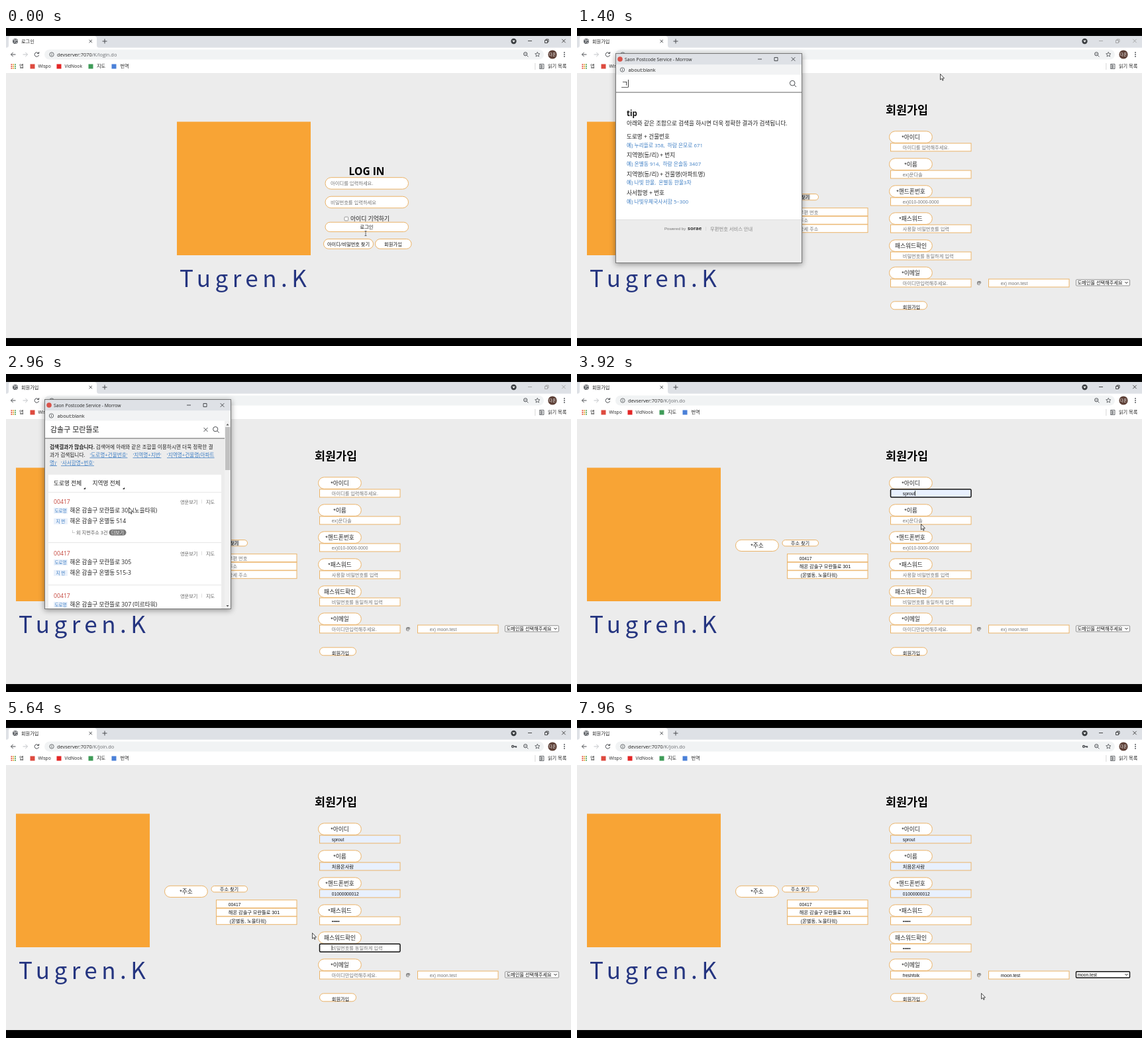
These frames come from a looping animation (853x480 px, 8000 ms). An HTML page:

```html
<!DOCTYPE html>
<html lang="ko">
<head>
<meta charset="utf-8">
<title>회원가입</title>
<style>
html, body { margin: 0; width: 100%; height: 100%; overflow: hidden; background: #000; }
svg { display: block; width: 100%; height: 100%; font-family: "Open Sans", "Noto Sans CJK KR", sans-serif; }
text { white-space: pre; }
.form { font-family: "Liberation Sans", "Noto Sans CJK KR", sans-serif; }
.brand { font-family: "Noto Sans CJK KR", sans-serif; font-weight: 500; letter-spacing: 6.5px; }
.icon { fill: none; stroke: #4a4d51; stroke-width: 1; }
.popup { filter: drop-shadow(0 2px 4px #0006); }
.menu { filter: drop-shadow(0 1px 2px #0005); }
</style>
</head>
<body>
<svg id="stage" viewBox="0 0 853 480"></svg>
<script>
const LOOP = 8000, JOIN = 400, OPEN = 920, RESULTS = 2400, PICKED = 3080;
const ORANGE = '#f8a435', EDGE = '#ebb368', GRAY = '#757575', BLUE = '#3f7fc4';
const stage = document.getElementById('stage');

const text = (x, y, s, size, fill = '#222', extra = '') =>
  `<text x="${x}" y="${y}" font-size="${size}" fill="${fill}" ${extra}>${s}</text>`;
const mid = 'text-anchor="middle"', bold = 'font-weight="700"', form = 'class="form"';
const rect = (x, y, w, h, fill, extra = '') =>
  `<rect x="${x}" y="${y}" width="${w}" height="${h}" fill="${fill}" ${extra}/>`;
const pill = (x, y, w, h) => rect(x, y, w, h, '#fff', `rx="${h / 2}" stroke="${EDGE}"`);
const dot = (x, y, r, fill) => `<circle cx="${x}" cy="${y}" r="${r}" fill="${fill}"/>`;
const icon = (d, extra = '') => `<path class="icon" d="${d}" ${extra}/>`;
const ring = (x, y, r) => `M${x - r} ${y}a${r} ${r} 0 1 0 ${2 * r} 0a${r} ${r} 0 1 0 ${-2 * r} 0`;
const cross = (x, y, r) => `M${x - r} ${y - r}l${2 * r} ${2 * r}m0 ${-2 * r}l${-2 * r} ${2 * r}`;
const during = (from, to, body) => `<g data-on="${from},${to}">${body}</g>`;
const formSize = s => /[가-힣]/.test(s) ? 7.2 : 6.7;

const windowButtons = color => icon(
  `M788 19.5h6M813.5 18.5h4v4h-4zM815 18.5v-1.5h4v4h-1.5${cross(842, 19.5, 2.7)}`,
  `style="stroke:${color};stroke-width:.8"`);
const infoIcon = (x, y) => icon(`${ring(x, y, 3.2)}M${x} ${y - .6}v2.4M${x} ${y - 2}v.8`, 'style="stroke-width:.8"');
const magnifier = (x, y, r) => icon(`${ring(x - .8, y - .8, r)}M${x + r * .6} ${y + r * .6}l${r * .7} ${r * .7}`);

function browser() {
  let apps = '';
  for (let i = 0; i < 9; i++)
    apps += rect(7.5 + i % 3 * 2.8, 54.3 + Math.floor(i / 3) * 2.8, 1.8, 1.8, ['#e0483c', '#e5a52e', '#54a35c'][i % 3]);
  const url = page => text(77, 42.8, `devserver:7070<tspan fill="#6b6e72">/K/${page}.do</tspan>`, 7.4);
  const star = Array.from({ length: 10 }, (_, i) => {
    const a = i * Math.PI / 5 - Math.PI / 2, r = i % 2 ? 1.7 : 3.8;
    return [802.3 + r * Math.cos(a), 40 + r * Math.sin(a)].map(n => n.toFixed(2));
  }).join('L');
  return rect(0, 12, 853, 18, '#dee1e6')
    + '<path d="M0 30q4 0 4-4V16q0-4 4-4H133q4 0 4 4v10q0 4 4 4z" fill="#fff"/>'
    + rect(0, 29.7, 853, 38.3, '#fff')
    + rect(58, 32.5, 754, 15, '#f1f3f4', 'rx="7.5"')
    + dot(14, 20, 4, '#5f6368')
    + icon('M11 18q3-1 3 1t-2 3M15 17q0 2 2.5 2M14.5 23l2-1.5', 'style="stroke:#fff;stroke-width:.9"')
    + during(0, JOIN, text(23, 22.5, '로그인', 7.2) + url('login'))
    + during(JOIN, LOOP, text(23, 22.5, '회원가입', 7.2) + url('join'))
    + icon(`${cross(127.7, 20, 2.2)}M145.5 20h7M149 16.5v7`)
    + dot(766.5, 20, 4.2, '#3c4043') + '<path d="M764.3 18.8h4.4l-2.2 2.9z" fill="#fff"/>'
    + during(0, OPEN, windowButtons('#222'))
    + during(OPEN, PICKED, windowButtons('#999'))
    + during(PICKED, LOOP, windowButtons('#222'))
    + icon('M14.5 40h-7M10.7 36.8l-3.2 3.2l3.2 3.2')
    + icon('M25.5 40h7M29.3 36.8l3.2 3.2l-3.2 3.2', 'style="stroke:#c0c3c7"')
    + icon('M49 38.2a3.2 3.2 0 1 0 .5 2.6M49.7 36v2.6h-2.6')
    + infoIcon(69, 40) + magnifier(785, 40, 2.6) + icon('M783 39.2h2.4', 'style="stroke-width:.7"')
    + icon(`M${star}z`, 'style="stroke-width:.8"')
    + during(5200, LOOP, icon(`${ring(765, 40, 1.5)}M766.5 40h4v1.8M769 40v1.6`, 'style="stroke-width:1.3"'))
    + dot(825, 40, 6.6, '#5d4037') + text(825, 42, '다온', 5.6, '#fff', mid)
    + [37, 40, 43].map(y => dot(843, y, .9, '#4a4d51')).join('')
    + apps + text(20, 60.4, '앱', 7.2)
    + rect(36.5, 54.5, 7, 7, '#dd4a3f') + text(48.5, 60.4, 'Wispo', 6.7)
    + rect(76.5, 54.5, 7, 7, '#e32626') + text(88.5, 60.4, 'VidNook', 6.7)
    + rect(124.5, 54.5, 7, 7, '#3f9c58') + text(137, 60.4, '지도', 7.2)
    + rect(159.5, 54.5, 7, 7, '#4a80d8') + text(172.5, 60.4, '번역', 7.2)
    + rect(798.5, 53, .8, 10, '#ccc')
    + icon('M805.5 54.5h6.5v7h-6.5zM807 56.6h3.6M807 58.2h3.6M807 59.8h3.6M807.5 54.5v7', 'style="stroke-width:.8"')
    + text(818, 60.4, '읽기 목록', 7.2);
}

const brand = x => rect(x, 141.5, 202, 201.5, ORANGE)
  + text(x + 4, 391, 'Tugren.K', 35, '#253580', 'class="brand"');

function loginPage() {
  return brand(258)
    + text(544.5, 221.7, 'LOG IN', 15.5, '#000', `${mid} ${bold}`)
    + pill(482, 225.7, 125.5, 17.5) + text(490, 237, '아이디를 입력하세요.', 7.3, GRAY)
    + pill(482, 254.2, 125.5, 17.5) + text(490, 265.6, '비밀번호를 입력하세요', 7.3, GRAY)
    + rect(511, 285.2, 5.6, 5.6, '#fff', 'rx="1" stroke="#767676" stroke-width=".7"')
    + text(520, 291.2, '아이디 기억하기', 8.8)
    + pill(482, 293.2, 125.5, 14.3) + text(544.5, 303.2, '로그인', 7.3, '#111', mid)
    + pill(479.5, 318.5, 75, 14.8) + text(517, 328.6, '아이디/비밀번호 찾기', 7.2, '#111', mid)
    + pill(557.5, 318.5, 54.5, 14.8) + text(584.5, 328.6, '회원가입', 7.3, '#111', mid);
}

// Each field is filled at once from `at`, or typed when `step` is given.
const fields = [
  { x: 473.5, y: 174, hint: '아이디를 입력해주세요.', value: 'sprout', at: 3840, focus: [3480, 4080], auto: true },
  { x: 473.5, y: 215, hint: 'ex)문다솔', value: '처음온사람', at: 4360, focus: [4080, 4480], auto: true },
  { x: 473.5, y: 256, hint: 'ex)010-0000-0000', value: '01000000012', at: 4860, focus: [4480, 5060], auto: true },
  { x: 473.5, y: 297, hint: '사용할 비밀번호를 입력', value: '•••••', at: 5160, step: 60, focus: [5060, 5580] },
  { x: 473.5, y: 338, hint: '비밀번호를 동일하게 입력', value: '•••••', at: 5760, step: 60, focus: [5580, 6300] },
  { x: 473.5, y: 379, hint: '아이디만입력해주세요.', value: 'freshfolk', at: 6400, step: 50, focus: [6300, 7200] },
  { x: 621.5, y: 379, hint: 'ex) moon.test', value: 'moon.test', at: 7560 },
  { x: 317.5, y: 271.7, hint: '우편 번호', value: '00417', at: PICKED },
  { x: 317.5, y: 284.2, hint: '주소', value: '해온 감솔구 모란뜰로 301', at: PICKED },
  { x: 317.5, y: 296.7, hint: '상세 주소', value: ' (온별동, 노을타워)', at: PICKED }
];

function joinPage() {
  const labels = ['*아이디', '*이름', '*핸드폰번호', '*패스워드', '패스워드확인', '*이메일'];
  const label = (x, y, s) => text(x, y, s, 8.7, '#222', `${mid} ${form}`);
  const select = (s, edge, width) => rect(753.5, 379.8, 81, 9.2, '#fff', `rx="1" stroke="${edge}" stroke-width="${width}"`)
    + text(755.5, 387, s, formSize(s), '#111', form)
    + icon('M827.5 383.4l2 2l2-2', 'style="stroke:#111"');
  return brand(15)
    + text(466, 130, '회원가입', 17.4, '#000', bold)
    + labels.map((s, i) => pill(471.5, 155.8 + 41 * i, 64.8, 17.6) + label(504, 167.7 + 41 * i, s)).join('')
    + pill(239.5, 250.3, 64.8, 17.2) + label(272, 262.3, '*주소')
    + pill(310, 250.5, 54.5, 9.3)
    + during(OPEN, PICKED, rect(322.5, 251, 29.5, 8.3, '#ccc'))
    + text(337, 257.8, '주소 찾기', 7.2, '#111', mid)
    + fields.map((f, i) => `<g id="field${i}">${rect(f.x, f.y, 121.5, 12, '#fff')}${text(f.x + 18.3, f.y + 8.8, '', 7, GRAY, form)}${rect(0, f.y + 2, .7, 8, '#111')}</g>`).join('')
    + text(607, 387, '@', 7.6, '#222', mid)
    + during(JOIN, 7240, select('도메인을 선택해주세요', '#767676', .8))
    + during(7240, 7560, select('도메인을 선택해주세요', '#111', 1.4))
    + during(7560, LOOP, select('moon.test', '#111', 1.4))
    + pill(473.5, 412.8, 55, 12) + text(505, 423.8, '회원가입', 7.2, '#111', mid)
    + during(4500, 4860, `<g class="menu">${rect(473.5, 270, 122.5, 128, '#fff', 'rx="2"')}</g>`
      + [12, 33, 58, 45, 46, 72].map((n, i) => text(480, 285.5 + 20 * i, '010000000' + n, 7)).join(''));
}

function tips() {
  const rows = [
    ['도로명 + 건물번호', '누리뜰로 358,  하람 은모로 671'],
    ['지역명(동/리) + 번지', '온별동 914,  하람 은솔동 3407'],
    ['지역명(동/리) + 건물명(아파트명)', '나빛 한울,  온별동 한울3차'],
    ['사서함명 + 번호', '나빛우체국사서함 5~300']
  ];
  return rect(58, 97, 282, 192, '#fff') + rect(58, 289, 282, 66, '#ececec') + rect(58, 289, 282, .8, '#ddd')
    + rect(58.5, 96.6, 281, 1, '#666') + magnifier(326, 84, 3.8)
    + text(75, 133, 'tip', 11.5, '#111', bold)
    + text(75, 146.8, '아래와 같은 조합으로 검색을 하시면 더욱 정확한 결과가 검색됩니다.', 8.65)
    + rows.map(([name, sample], i) => text(75, 167 + 28.4 * i, name, 8.65)
      + text(75, 179.6 + 28.4 * i, '예) ' + sample, 7.8, BLUE)).join('')
    + text(132, 305, 'Powered by', 6.1, GRAY, form)
    + text(167, 305.2, 'sorae', 7.8, '#333', bold)
    + rect(194.5, 300, .6, 6, '#ccc') + text(201, 305.5, '우편번호 서비스 안내', 7.3, '#888');
}

function results() {
  const badge = (y, s) => rect(72, y - 7.4, 21, 9, '#eaf1fb') + text(82.5, y - .4, s, 6.6, BLUE, mid);
  const item = (y, road, lot) => text(72, y, '00417', 8.7, '#c4453c')
    + text(263, y, '영문보기', 7.2, '#666') + rect(295, y - 6, .6, 6, '#ccc') + text(302, y, '지도', 7.2, '#666')
    + badge(y + 13.7, '도로명') + text(96.5, y + 13.7, '해온 감솔구 모란뜰로 ' + road, 8.6)
    + badge(y + 29.7, '지 번') + text(96.5, y + 29.7, '해온 감솔구 온별동 ' + lot, 8.6);
  const link = (x, y, s) => text(x, y, s, 7.65, BLUE, 'text-decoration="underline"');
  return rect(58, 97, 282, 258, '#ececec') + rect(64, 152, 261, 203, '#fff')
    + rect(58.5, 96.6, 271.5, 1, '#666')
    + icon(cross(301.5, 84, 3)) + magnifier(317, 84, 3.6)
    + text(66, 113, `<tspan ${bold}>검색결과가 많습니다.</tspan> 검색어에 아래와 같은 조합을 이용하시면 더욱 정확한 결`, 7.7)
    + text(66, 125, '과가 검색됩니다.', 7.7)
    + link(126.5, 125, "'도로명+건물번호'") + link(191.5, 125, "'지역명+지번'") + link(243, 125, "'지역명+건물명(아파트")
    + link(66, 137, "명)'") + link(83, 137, "'사서함명+번호'")
    + text(72, 167.5, '도로명 전체', 8.7) + text(130.5, 167.5, '지역명 전체', 8.7)
    + '<path d="M120 171v3h-3zM179 171v3h-3z" fill="#222"/>'
    + [178, 254, 318].map(y => rect(64, y, 261, .8, '#e2e2e2')).join('')
    + item(195.5, '301 (노을타워)', '514')
    + text(97, 241.6, '└ 외 지번주소 3건', 7.2, '#555')
    + rect(155.5, 234.8, 26, 9, '#777', 'rx="4.5"') + text(168.5, 241.8, '더보기', 6.9, '#fff', mid)
    + item(273.5, '305', '515-3') + item(337.5, '307 (미르타워)', '516')
    + rect(330, 70.5, 9.5, 284.5, '#f1f1f1') + rect(331, 80, 7.5, 65, '#c1c1c1')
    + '<path d="M332.5 77.5h4l-2-2.5zM332.5 349h4l-2 2.5z" fill="#555"/>';
}

function popup() {
  return '<clipPath id="frame"><rect x="58" y="38" width="282" height="317"/></clipPath>'
    + `<g class="popup">${rect(58, 38, 282, 317, '#fff')}</g><g clip-path="url(#frame)">`
    + rect(58, 38, 282, 17.5, '#dee1e6') + rect(58, 55.5, 282, 15, '#f2f3f4')
    + dot(65, 47, 3.8, '#d9534a')
    + text(72, 49.7, 'Saon Postcode Service - Morrow', 6.8)
    + icon(`M273 47h6M298 44.5h5v5h-5z${cross(326.5, 47, 2.8)}`)
    + infoIcon(68.5, 63) + text(77.5, 65.7, 'about:blank', 7.4)
    + during(OPEN, RESULTS, tips()) + during(RESULTS, PICKED, results())
    + text(67, 87.5, '', 11, '#222', 'id="query"')
    + during(OPEN, RESULTS, rect(0, 78, .8, 11.5, '#111', 'id="queryCaret"') + rect(67, 89.3, 0, .8, '#333', 'id="queryLine"'))
    + rect(58.5, 38.5, 281, 316, 'none', 'stroke="#777"') + '</g>';
}

// Every keystroke of a Korean input method, as the text it leaves behind.
function keystrokes(phrase) {
  const leads = 'ㄱㄲㄴㄷㄸㄹㅁㅂㅃㅅㅆㅇㅈㅉㅊㅋㅌㅍㅎ', states = [];
  let done = '';
  for (const ch of phrase) {
    const n = ch.charCodeAt(0) - 0xAC00;
    if (n >= 0) {
      states.push(done + leads[Math.floor(n / 588)]);
      if (n % 28) states.push(done + String.fromCharCode(0xAC00 + n - n % 28));
    }
    states.push(done += ch);
  }
  return states;
}

stage.innerHTML = rect(0, 0, 853, 480, '#000') + rect(0, 68, 853, 400, '#ececec')
  + browser()
  + during(0, JOIN, loginPage()) + during(JOIN, LOOP, joinPage())
  + during(OPEN, PICKED, popup())
  + `<g id="pointer"><path id="arrow" d="M-2.5-4.5v8.6l2-1.8l1.4 3l1.2-.6l-1.3-2.8h2.7z" fill="#fff" stroke="#222" stroke-width=".8"/>
     <path id="beam" class="icon" d="M-1.5-3.5h3M0-3.5v7M-1.5 3.5h3" style="stroke-width:.8"/></g>`;

const $ = id => document.getElementById(id);
const timed = [...stage.querySelectorAll('[data-on]')].map(el => [el, ...el.dataset.on.split(',').map(Number)]);
const parts = fields.map((f, i) => $('field' + i).children);
const query = keystrokes('감솔구 모란뜰로');

const path = [
  [0, 543, 310], [320, 585, 327], [440, 585, 327], [800, 338, 257], [920, 338, 257],
  [1240, 551, 74], [2360, 551, 74], [2720, 188, 206], [3080, 188, 206], [3440, 533, 181],
  [3640, 533, 181], [3800, 508, 204], [3920, 522, 231], [4080, 530, 222], [4300, 512, 243],
  [4460, 532, 263], [4520, 532, 263], [4600, 532, 274], [4800, 505, 284], [4880, 505, 284],
  [5040, 530, 303], [5160, 530, 303], [5400, 465, 326], [6100, 465, 326], [6300, 530, 385],
  [6860, 530, 385], [7160, 790, 385], [7560, 790, 386], [7900, 613, 417], [8000, 613, 417]
];
const beams = [[0, 120], [3400, 3560], [4040, 4160], [4440, 4560], [5000, 5200], [6260, 6900]];
const within = (t, [a, b]) => t >= a && t < b;
const show = (el, on) => { el.style.display = on ? '' : 'none'; };
const set = (el, attrs) => { for (const k in attrs) el.setAttribute(k, attrs[k]); };

function drawField(f, [box, label, caret], t) {
  const count = f.step ? Math.floor((t - f.at) / f.step) + 1 : f.value.length;
  const value = t < f.at ? '' : f.value.slice(0, count);
  const focused = !!f.focus && within(t, f.focus), shown = value || f.hint;
  label.textContent = shown;
  set(label, { fill: value ? '#111' : GRAY, 'font-size': formSize(shown) });
  set(box, {
    fill: value && f.auto ? '#e8f0fe' : '#fff',
    stroke: focused ? '#111' : EDGE, 'stroke-width': focused ? 1.5 : 1, rx: focused ? 1.5 : 0
  });
  show(caret, focused);
  if (focused) set(caret, { x: f.x + 18.2 + (value ? label.getComputedTextLength() : 0) });
}

function drawQuery(t) {
  const i = Math.min(Math.floor((t - 1360) / 50), query.length - 1);
  $('query').textContent = i < 0 ? '' : query[i];
  const width = $('query').getComputedTextLength();
  set($('queryCaret'), { x: 67 + width });
  set($('queryLine'), { x: 67 + Math.max(0, width - 10), width: Math.min(width, 10) });
}

function drawPointer(t) {
  const i = path.findIndex(p => p[0] > t);
  const [t0, x0, y0] = path[i - 1], [t1, x1, y1] = path[i];
  const u = (t - t0) / (t1 - t0), k = u * u * (3 - 2 * u);
  set($('pointer'), { transform: `translate(${x0 + (x1 - x0) * k} ${y0 + (y1 - y0) * k})` });
  const beam = beams.some(b => within(t, b));
  show($('beam'), beam);
  show($('arrow'), !beam);
}

function draw() {
  const t = performance.now() % LOOP;
  for (const [el, from, to] of timed) show(el, within(t, [from, to]));
  if (t >= JOIN) fields.forEach((f, i) => drawField(f, parts[i], t));
  if (within(t, [OPEN, PICKED])) drawQuery(t);
  drawPointer(t);
  requestAnimationFrame(draw);
}
draw();
</script>
</body>
</html>
```
